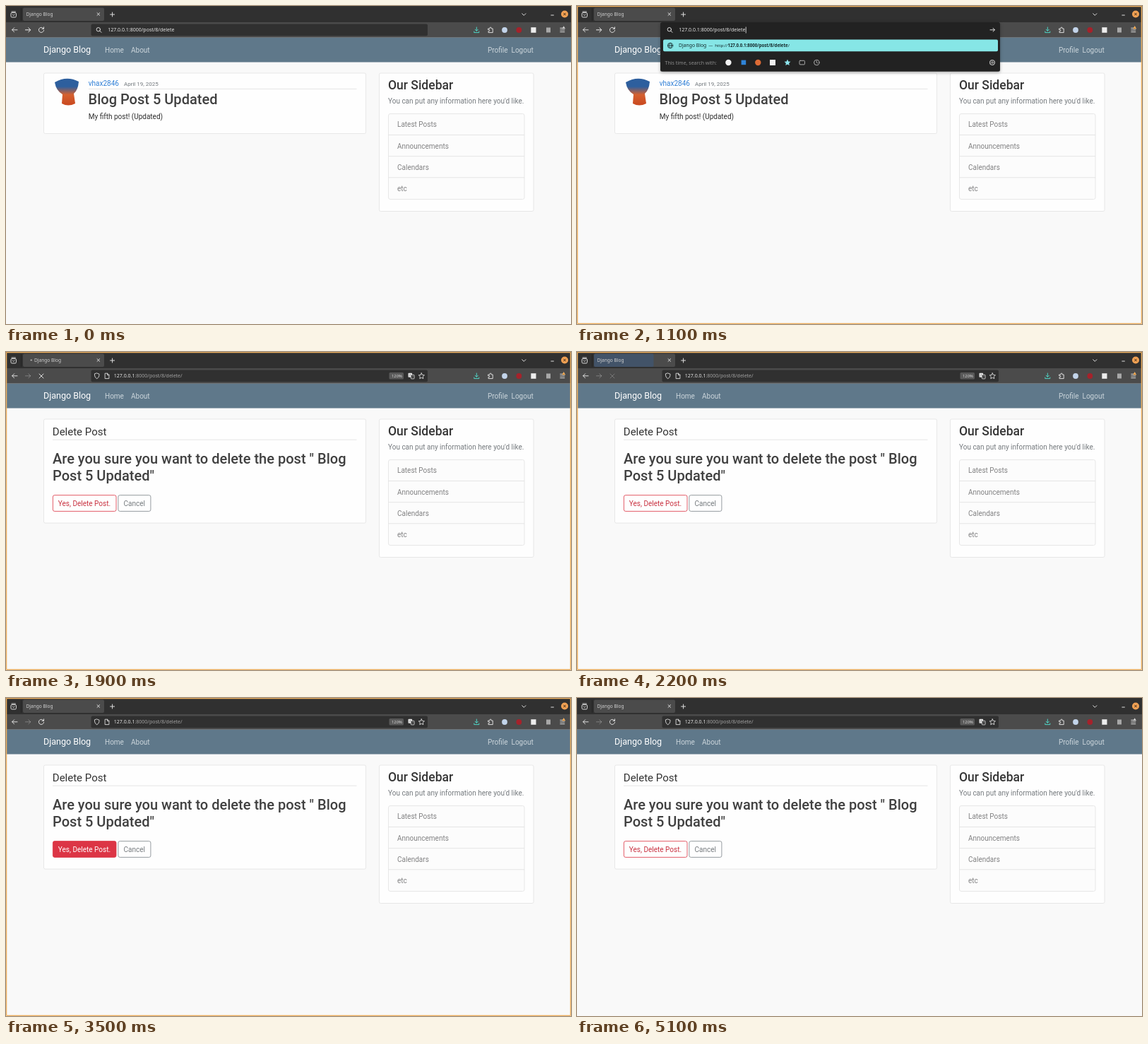
An HTML page for the animation above (5.2 s loop, 800x450 px).

```html
<!DOCTYPE html>
<html lang="en">
<head>
<meta charset="utf-8">
<title>Django Blog</title>
<style>
html, body { margin: 0; width: 100%; height: 100%; overflow: hidden; background: #f9f9f9; }
svg { display: block; width: 100vw; height: 100vh; }
text { font: 10px Roboto, sans-serif; white-space: pre; }
.ui text { font: 7px "Noto Sans", sans-serif; fill: #e6e6e6; }
.ui .tab { font-size: 6.6px; fill: #cfcfcf; }
.ui .dim { fill: #a2a2a2; }
.ui .dark { fill: #15292b; }
.ui .hit { font-size: 6.1px; fill: #15292b; }
.ui .zoom { font-size: 5.8px; fill: #d8d8d8; }
.bold { font-weight: 700; }
.line { fill: none; stroke: #dedede; stroke-width: 1; stroke-linecap: round; stroke-linejoin: round; }
.faint { opacity: .35; }
.card { fill: #fefefe; stroke: #e2e2e2; stroke-width: .8; }
.rule { stroke: #e0e0e0; stroke-width: .8; }
.brand { font-size: 12.5px; fill: #fff; }
.link { fill: #cbd5db; }
.name { fill: #2f7fd6; }
.date { font-size: 8px; fill: #71777c; }
.h2 { font-size: 20px; font-weight: 500; fill: #404040; }
.h3 { font-size: 17.5px; font-weight: 500; fill: #363636; }
.legend { font-size: 15px; fill: #333; }
.body { fill: #2d2d2d; }
.muted { fill: #757a7e; }
.item { fill: #818182; }

/* Loop of 5200 ms: focus .8 s, enter 1.4 s, page 1.9 s, loaded 2.1 s, hover 3 s, blur 4.8 s */
.focus, .menu, .caret, .typed, .load, .busy, .ring, .stop, .ready, .old, .new, .fresh { animation: 5.2s step-end infinite; }
.focus { animation-name: focus; }
.menu { animation-name: menu; }
.caret { animation: blink 1s step-end infinite; animation-delay: .8s; }
.load { animation-name: load; }
.busy { animation-name: busy; }
.ring { animation-name: ring; }
.stop { animation-name: stop; }
.ready { animation-name: ready; }
.old { animation-name: old; }
.new { animation-name: new; }
.dot { animation: dot .4s ease-in-out infinite alternate; }
.burst { transform-origin: 24px 0; animation: burst 5.2s linear infinite; }
.yes { stroke: #dc3545; stroke-width: .8; animation: fill 5.2s linear infinite; }
.yes-text { animation: ink 5.2s linear infinite; }
@keyframes focus { 0% { opacity: 0 } 15.38% { opacity: 1 } 92.3%, 100% { opacity: 0 } }
@keyframes menu { 0% { opacity: 0 } 15.38% { opacity: 1 } 26.92%, 100% { opacity: 0 } }
@keyframes blink { 0% { opacity: 1 } 50%, 100% { opacity: 0 } }
@keyframes load { 0% { opacity: 0 } 26.92% { opacity: 1 } 36.53%, 100% { opacity: 0 } }
@keyframes busy { 0% { opacity: 0 } 26.92% { opacity: 1 } 40.38%, 100% { opacity: 0 } }
@keyframes ready { 0% { opacity: 1 } 26.92% { opacity: 0 } 40.38%, 100% { opacity: 1 } }
@keyframes ring { 0% { opacity: 1 } 30.76% { opacity: 0 } 44.23%, 100% { opacity: 1 } }
@keyframes stop { 0% { opacity: 0 } 30.76% { opacity: 1 } 40.38% { opacity: .3 } 44.23%, 100% { opacity: 0 } }
@keyframes old { 0% { opacity: 1 } 36.53%, 100% { opacity: 0 } }
@keyframes new { 0% { opacity: 0 } 36.53%, 100% { opacity: 1 } }
@keyframes dot { from { transform: translateX(0) } to { transform: translateX(6px) } }
@keyframes burst {
  0%, 40.38% { transform: scaleX(0); opacity: .75 }
  42.31% { transform: scaleX(.73); opacity: .75 }
  43.3% { transform: scaleX(1); opacity: .6 }
  47%, 100% { transform: scaleX(1); opacity: 0 }
}
@keyframes fill { 0%, 57.69% { fill: #fefefe } 60.57%, 92.3% { fill: #dc3545 } 95.19%, 100% { fill: #fefefe } }
@keyframes ink { 0%, 57.69% { fill: #c9303f } 60.57%, 92.3% { fill: #fff } 95.19%, 100% { fill: #c9303f } }
</style>
</head>
<body>
<svg viewBox="0 0 800 450" preserveAspectRatio="none">
  <defs>
    <linearGradient id="photo" x1="0" y1="0" x2="0" y2="1">
      <stop offset=".3" stop-color="#2d5f9e"/>
      <stop offset=".6" stop-color="#d5602f"/>
      <stop offset="1" stop-color="#c9481f"/>
    </linearGradient>
    <filter id="shade" x="-5%" y="-20%" width="110%" height="150%">
      <feDropShadow dx="0" dy="1.5" stdDeviation="2" flood-opacity=".3"/>
    </filter>
  </defs>

  <!-- Page -->
  <rect width="800" height="450" fill="#f9f9f9"/>
  <rect y="44.5" width="800" height="35" fill="#5f788a"/>
  <text class="brand" x="53" y="66.4">Django Blog</text>
  <g class="link">
    <text x="140" y="66">Home</text>
    <text x="177" y="66">About</text>
    <text x="682" y="66">Profile</text>
    <text x="715.5" y="66">Logout</text>
  </g>

  <rect class="card" x="528.5" y="95" width="218.5" height="195.5" rx="2"/>
  <text class="h3" x="541" y="117.6">Our Sidebar</text>
  <text class="muted" x="541" y="138.4">You can put any information here you'd like.</text>
  <rect class="card" x="541.5" y="152.5" width="192.5" height="121" rx="2.5" style="fill:#fcfcfc"/>
  <path class="rule" d="M541.5 182.5h192.5M541.5 212.6h192.5M541.5 242.8h192.5"/>
  <g class="item">
    <text x="554" y="171.4">Latest Posts</text>
    <text x="554" y="201.6">Announcements</text>
    <text x="554" y="231.8">Calendars</text>
    <text x="554" y="262">etc</text>
  </g>

  <g class="old">
    <rect class="card" x="53.5" y="95" width="456" height="85.5" rx="2"/>
    <path fill="url(#photo)" d="M69 108Q86 98 103 107Q102 119 96 124L98 138Q88 143 79 138L80 125Q71 120 69 108Z"/>
    <text class="name" x="116.7" y="112.6">vhax2846</text>
    <text class="date" x="167" y="112.6">April 19, 2025</text>
    <path class="rule" d="M117 117.4H496.5"/>
    <text class="h2" x="116.5" y="138.8">Blog Post 5 Updated</text>
    <text class="body" x="116.7" y="160.2">My fifth post! (Updated)</text>
  </g>

  <g class="new">
    <rect class="card" x="53.5" y="95" width="456" height="147" rx="2"/>
    <text class="legend" x="65.8" y="118.3">Delete Post</text>
    <path class="rule" d="M66 124.2H496.5"/>
    <text class="h2" x="66" y="158">Are you sure you want to delete the post " Blog</text>
    <text class="h2" x="66" y="182">Post 5 Updated"</text>
    <rect class="yes" x="66.4" y="202.6" width="89.6" height="22.8" rx="2.4"/>
    <text class="yes-text" x="73.8" y="217.6">Yes, Delete Post.</text>
    <rect x="158.9" y="202.6" width="46" height="22.8" rx="2.4" fill="#fefefe" stroke="#7d848a" stroke-width=".8"/>
    <text class="muted" x="166.5" y="217.6">Cancel</text>
  </g>

  <!-- Browser -->
  <g class="ui">
    <rect width="800" height="23.5" fill="#303030"/>
    <rect y="23" width="800" height="21.6" fill="#4b4b4b"/>
    <path d="M21.5 3v18" stroke="#222" stroke-width=".8"/>
    <rect x="24" y="2.5" width="115" height="18.5" rx="2" fill="#4b4b4b"/>
    <rect class="burst" x="24" y="2.5" width="115" height="18.5" rx="2" fill="#405672"/>
    <text class="tab ready" x="28.5" y="14">Django Blog</text>
    <g class="busy">
      <circle class="dot" cx="30.5" cy="11.5" r="1" fill="#d8d8d8"/>
      <text class="tab" x="40" y="14">Django Blog</text>
    </g>
    <g class="line">
      <rect x="7" y="9.5" width="7.4" height="6.4" rx="1.3"/>
      <path d="M8 8h5.4M9.2 12l1.5 1.4 1.5-1.4M129 9.7l3.6 3.6m0-3.6l-3.6 3.6M147.6 12h6M150.6 9v6M730.7 10.7l2.6 2.6 2.6-2.6M771.8 13h3.6"/>
    </g>
    <circle cx="791" cy="11.5" r="5" fill="#f2a254"/>
    <path d="M789.3 9.8l3.4 3.4m0-3.4l-3.4 3.4" stroke="#3a2a1c" stroke-width="1"/>

    <path class="line" d="M16 33.8H8.6M11.6 30.8l-3 3 3 3"/>
    <path class="line faint" d="M27.5 33.8h7.2M31.8 30.8l3 3-3 3"/>
    <path class="line old" d="M27.5 33.8h7.2M31.8 30.8l3 3-3 3"/>
    <path class="line ring" d="M53.1 32A3.6 3.6 0 1 0 53.6 34.3M53.5 29.8v2.5h-2.5"/>
    <path class="line stop" d="M47 31l6 6m0-6l-6 6"/>
    <rect x="120.5" y="25.5" width="476.5" height="16.8" rx="2" fill="#303030"/>

    <g class="old">
      <g class="menu">
        <rect x="118" y="23" width="481" height="69.8" rx="2.5" fill="#222" filter="url(#shade)"/>
        <rect x="122" y="47.6" width="474" height="16.6" rx="2" fill="#86e6e6"/>
        <g class="line" style="stroke:#15292b;stroke-width:.8">
          <circle cx="132" cy="56" r="3.7"/>
          <ellipse cx="132" cy="56" rx="1.7" ry="3.7"/>
          <path d="M128.4 56h7.2"/>
        </g>
        <text class="dark" x="144" y="58.4" style="font-size:6.8px">Django Blog</text>
        <text class="hit" x="186.3" y="58.2">—</text>
        <text class="hit" x="195.3" y="58.2">http://<tspan class="bold">127.0.0.1:8000/post/8/delete</tspan>/</text>
        <text x="124.6" y="82.5" style="fill:#8c8c8c">This time, search with:</text>
        <circle cx="214.4" cy="80" r="4.2" fill="#f2f2f2"/>
        <rect x="232.6" y="76.6" width="6.6" height="6.6" fill="#2f84d8"/>
        <circle cx="256.3" cy="80" r="4.2" fill="#dd6b35"/>
        <rect x="273" y="76" width="8" height="8" fill="#efefef"/>
        <path d="M298 75.6l1.3 2.8 3.1.4-2.3 2.1.6 3.1-2.7-1.5-2.7 1.5.6-3.1-2.3-2.1 3.1-.4z" fill="#8fe6ee"/>
        <g class="line" style="stroke:#bbb;stroke-width:.9">
          <rect x="315" y="77.3" width="7.4" height="5.6" rx="1"/>
          <circle cx="339.3" cy="80" r="3.7"/>
          <path d="M339.3 77.8V80l1.4 1"/>
          <circle cx="588" cy="80" r="1.3"/>
          <circle cx="588" cy="80" r="3.4" stroke-width="1.3" stroke-dasharray="1.6 1.07"/>
        </g>
      </g>
      <rect class="load" x="237.6" y="29.2" width="4.2" height="9.6" fill="#7fdde3"/>
      <text x="144.2" y="36.4">127.0.0.1:8000/post/8/delete</text>
      <text class="load" x="238.4" y="36.4" style="fill:#222">/</text>
      <g class="menu"><path class="caret" d="M239.2 29.5v9" stroke="#f2f2f2" stroke-width=".8"/></g>
      <g class="line">
        <circle cx="130.8" cy="33.2" r="2.7"/>
        <path d="M132.8 35.2l2.2 2.2"/>
        <path class="menu" d="M585 33.8h6.4M589 31.3l2.5 2.5-2.5 2.5"/>
        <path class="load" d="M585 33.8h6.4M589 31.3l2.5 2.5-2.5 2.5"/>
      </g>
    </g>

    <g class="new">
      <g class="line" style="stroke-width:.9">
        <path d="M128.7 30l3.3 1.2c.1 3-.8 5.200-3.300 6.500-2.500-1.300-3.400-3.500-3.300-6.500z"/>
        <path d="M140.500 30.200h3.200l2.200 2.200v5.200h-5.400zM143.500 30.300v2.300h2.300"/>
        <path d="M588.300 29.800l1.200 2.600 2.900.4-2.100 2 .5 2.900-2.500-1.400-2.500 1.400.5-2.900-2.100-2 2.900-.4z"/>
      </g>
      <text x="152.800" y="36.400">127.0.0.1<tspan class="dim">:8000/post/8/delete/</tspan></text>
      <rect x="542.500" y="29" width="20.500" height="9.600" rx="1.500" fill="#595959"/>
      <text class="zoom" x="546" y="36">120%</text>
      <rect x="569.500" y="29.800" width="5.600" height="6" rx=".8" fill="#e4e4e4"/>
      <rect x="573.300" y="32.300" width="4.800" height="5.600" rx=".8" fill="#303030" stroke="#e4e4e4" stroke-width=".8"/>
      <path d="M571 34.500l1.300-3.200 1.300 3.200M575 34h1.600M574.800 36.500l1.800-2" fill="none" stroke="#999" stroke-width=".6"/>
    </g>

    <!-- Toolbar buttons -->
    <path class="line" style="stroke:#4fd6c6" d="M666.300 30v5M664.200 33.200l2.100 2.100 2.100-2.100M662.800 36v1.600h7V36"/>
    <path class="line" d="M683 32h2v-.8a1.100 1.100 0 0 1 2.200 0v.8h2v5.600h-6.200v-2h.8a1 1 0 0 0 0-2H683z"/>
    <circle cx="706" cy="34" r="3.900" fill="#c3d4ea"/>
    <circle cx="726.300" cy="34" r="3.900" fill="#a5222b"/>
    <rect x="743.300" y="30.200" width="7.200" height="7.600" fill="#ededed"/>
    <rect x="765" y="30.500" width="6" height="7" fill="#a8a8a8"/>
    <path class="line" d="M784.800 31.300h4M784.800 34h6M784.800 36.700h6"/>
    <path d="M789.700 28.300l2.300 4h-4.600z" fill="#cfcfcf"/>
    <path class="focus" d="M789.700 28.300l2.300 4h-4.600z" fill="#f3a447"/>

    <g class="load">
      <path d="M0 439.300h151.500q1.500 0 1.500 1.500V449H0z" fill="#2c2c2c"/>
      <text x="2" y="447" style="font-size:6.500px">127.0.0.1</text>
    </g>
  </g>
  <rect class="focus" x=".6" y=".6" width="798.800" height="448.800" rx="1" fill="none" stroke="#eeb05f" stroke-width="1.300"/>
</svg>
</body>
</html>
```
